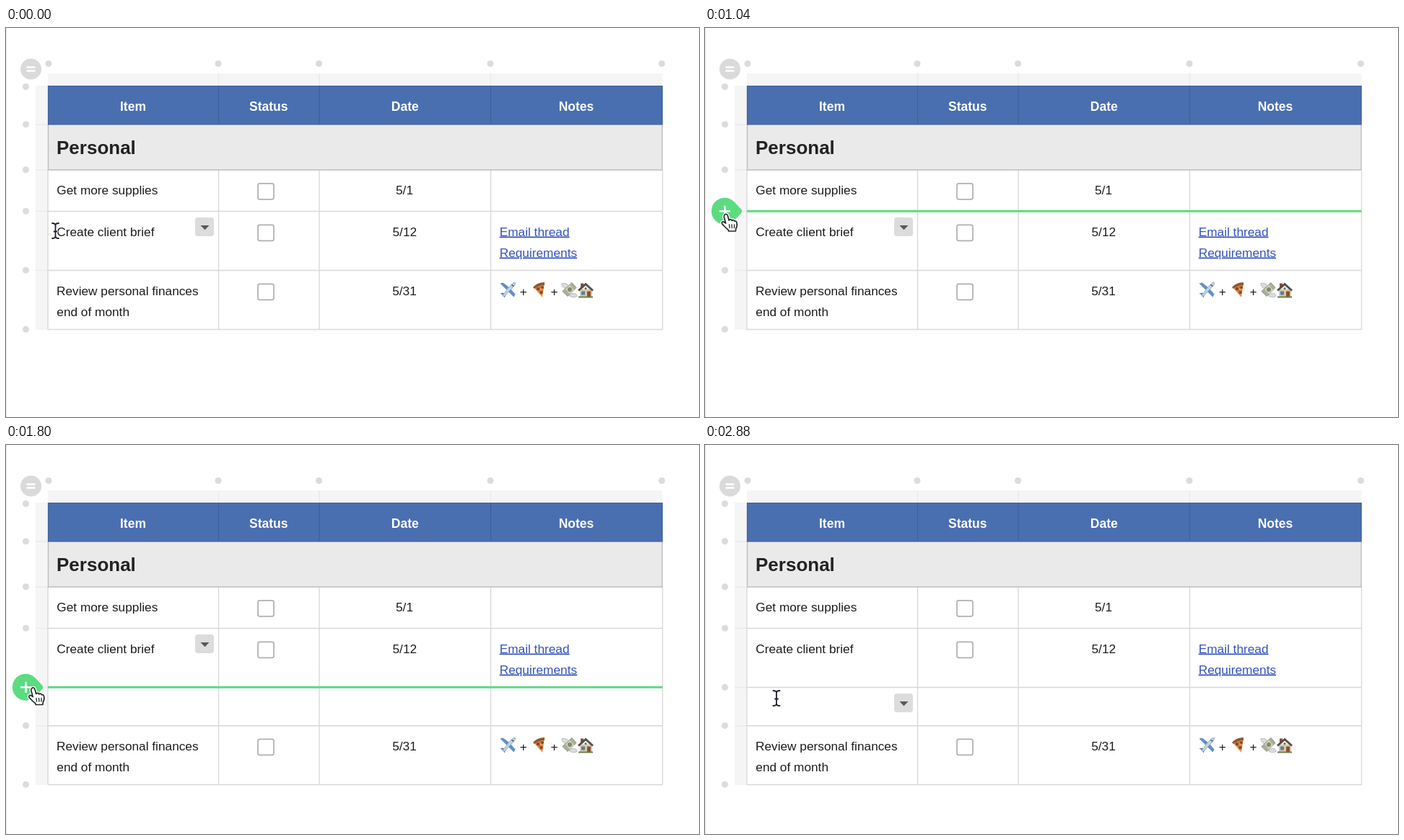
An HTML page that plays this animation: 960x540 px, repeating every 2900 ms.

```html
<!DOCTYPE html>
<html lang="en">
<head>
<meta charset="utf-8">
<title>Insert a table row</title>
<style>
  html, body { margin: 0; width: 100%; height: 100%; overflow: hidden; background: #fff; }
  svg { display: block; width: 960px; height: 540px; }
  text { font: 17.25px "Liberation Sans", Arial, sans-serif; fill: #1c1c1c; }
  .head { font-weight: bold; font-size: 17.5px; fill: #fff; }
  .group { font-weight: bold; font-size: 26px; fill: #222; }
  .mid { text-anchor: middle; }
  .link { fill: #3453bd; text-decoration: underline; }
</style>
</head>
<body>
<svg viewBox="0 0 960 540">
  <defs>
    <g id="plane" stroke-linejoin="round">
      <path d="M1 2L5 1L13 7L10 11ZM20 21L22 17L15 9L11 12Z" fill="#5f8fc8"/>
      <path d="M1 16L5 15L9 18L7 22L5 18Z" fill="#4779b5"/>
      <path d="M4 19L16 4Q20 0 22 1Q23 3 19 7L7 20Z" fill="#c3d3e3" stroke="#7f96b0" stroke-width=".7"/>
      <path d="M17 4L20 6" stroke="#34506f" stroke-width="1.5"/>
    </g>
    <g id="pizza">
      <path d="M2 7Q8 0 17 1L14 21Z" fill="#d99a4a"/>
      <path d="M1 7Q7 0 17 0L17 4Q9 4 3 9Z" fill="#8f5832"/>
      <g fill="#a53a2b"><circle cx="8" cy="9" r="2.3"/><circle cx="14" cy="7" r="2"/><circle cx="12.5" cy="14" r="2.2"/></g>
      <path d="M10 6l2 1M9 12l2-1M14 11l1 0" stroke="#5d7a35" stroke-width="1.2"/>
    </g>
    <g id="money">
      <path d="M5 9Q0 6 1 2Q8 1 11 6ZM15 16Q22 15 22 20Q17 23 11 19Z" fill="#d9dde0" stroke="#a4a9ab" stroke-width=".7"/>
      <path d="M2 13L15 1L21 8L9 20Z" fill="#a8b09a" stroke="#77806c" stroke-width=".8"/>
      <path d="M6 10L12 4L18 11L12 17Z" fill="#d6d0b4"/>
      <circle cx="12" cy="10.500" r="3" fill="#7f8b72"/>
    </g>
    <g id="house">
      <path d="M3 10H20V21H3Z" fill="#d8c8a9"/>
      <path d="M4 2H8V8H4Z" fill="#8d4c3b"/>
      <path d="M0 11L11 1L22 11L20 13L11 5L2 13Z" fill="#55504c"/>
      <path d="M5 13H10V18H5Z" fill="#597f9f"/>
      <path d="M13 13H18V21H13Z" fill="#8a5131"/>
      <path d="M1 20H21V22H1Z" fill="#65804b"/>
      <circle cx="11" cy="9" r="1.500" fill="#6c6257"/>
    </g>
  </defs>

  <path d="M.5 0V540" stroke="#e4e4e4"/>
  <g id="corner">
    <circle cx="34.500" cy="57" r="14.500" fill="#dadada"/>
    <path d="M28.500 54.500H40.500M28.500 59.500H40.500" stroke="#fff" stroke-width="2.300"/>
  </g>
  <g id="grid"></g>
  <g id="rows"></g>
  <g id="lastRow"></g>

  <g id="menu">
    <rect x="262" y="-13" width="26" height="26" rx="4" fill="#dcdcdc"/>
    <path d="M269.500-2H281.500L275.500 4.200Z" fill="#58585c"/>
  </g>
  <path id="caret" d="M71.300-15V12" stroke="#111" stroke-width="1.600"/>

  <g id="pin">
    <path d="M58 0H909.500" stroke="#5bdc80" stroke-width="3"/>
    <path d="M40.500-13L50.200-2.500Q52.200 0 50.200 2.500L40.500 13A18.500 18.500 0 1 1 40.500-13Z" fill="#5bdc80"/>
    <path d="M20 0H35M27.500-7.500V7.500" stroke="#fff" stroke-width="2.600"/>
  </g>

  <g id="hand" stroke-linejoin="round" stroke-linecap="round">
    <path id="palm" d="M-1.500 1C0-.8 2.500-.3 3 2L4.700 8.500C6 6.700 8.300 7.300 8.700 8.900C10 7.500 12 8.200 12.500 9.800C14 9 15.300 10.200 15.600 12C16.300 15 16 17.500 14.300 20L14 23.500H4.200L3.600 21.500C1 20-1.800 16.500-4.300 14.200C-6.500 12-4.500 9.500-2 10.900L.2 12.500L-2 4.500C-2.400 3-2.300 2-1.500 1Z" fill="#fff" stroke="#fff" stroke-width="4"/>
    <use href="#palm" style="stroke-width:4"/>
    <path id="handLine" fill="#fff" stroke="#24242c" stroke-width="1.700"/>
    <path d="M5 14.500L5.600 19M8.500 14.500L8.900 19M12 14.300V19" stroke="#24242c" stroke-width="1.300"/>
  </g>

  <g id="beam" fill="none" stroke-linecap="round">
    <path d="M-4.500-10.500Q0-10.500 0-7.500Q0-10.500 4.500-10.500M0-7.500V7.500M-4.500 10.500Q0 10.500 0 7.500Q0 10.500 4.500 10.500M-2 1H2" stroke="#fff" stroke-width="3.500"/>
    <path d="M-4.500-10.500Q0-10.500 0-7.500Q0-10.500 4.500-10.500M0-7.500V7.500M-4.500 10.500Q0 10.500 0 7.500Q0 10.500 4.500 10.500M-2 1H2" stroke="#20202e" stroke-width="1.800"/>
  </g>
</svg>
<script>
const LOOP = 2900;
const INSERT_AT = 1700, FOCUS_NEW_AT = 2350;
const NEW_ROW = 53;
const cols = [58, 294.5, 434, 671.5, 909.5];
const rowEdges = [80, 134, 197, 254.5, 336.5, 418.5];

// Time, x, y of the pointer's hot spot.
const path = [
  [0, 68.5, 281.5], [540, 68.5, 281.5], [700, 34.5, 267], [880, 28.5, 258.5],
  [1140, 28.5, 258.5], [1340, 36.5, 336.5], [1780, 37, 337], [2180, 37, 337],
  [2340, 99, 351.5], [LOOP, 99, 351.5]
];
const caretOn = [[450, 880], [1220, 1580], [FOCUS_NEW_AT, 2720]];
const pins = [[820, 1180, 254.5], [1300, 2230, 336.5]];

const $ = id => document.getElementById(id);
const within = (t, [from, to]) => t >= from && t < to;
const show = (el, on) => el.setAttribute("visibility", on ? "visible" : "hidden");
const move = (el, x, y) => el.setAttribute("transform", `translate(${x} ${y})`);

const text = (s, x, y, cls = "") => `<text x="${x}" y="${y}" class="${cls}">${s}</text>`;
const rect = (x, y, w, h, fill) => `<rect x="${x}" y="${y}" width="${w}" height="${h}" fill="${fill}"/>`;
const line = (d, color, w = 1.4) => `<path d="${d}" fill="none" stroke="${color}" stroke-width="${w}"/>`;
const dot = (x, y) => `<circle cx="${x}" cy="${y}" r="4.500" fill="#dcdcdc"/>`;
const check = y => `<rect x="349" y="${y}" width="22" height="22" rx="2.500" fill="#fff" stroke="#b0b0b0" stroke-width="1.700"/>`;
const icon = (id, x, y) => `<use href="#${id}" x="${x}" y="${y}"/>`;

function drawGrid(inserted) {
  const edges = inserted ? [...rowEdges.slice(0, 5), 389.8, 418.5 + NEW_ROW] : rowEdges;
  const bottom = edges[edges.length - 1];
  let s = rect(58, 63, 851.5, 17, "#f5f5f5") + rect(41, 80, 17, bottom - 79.5, "#f5f5f5");
  s += cols.slice(1, 4).map(x => line(`M${x} 63V80`, "#e9e9e9")).join("");
  s += edges.slice(1, -1).map(y => line(`M41 ${y}H58`, "#e9e9e9")).join("");
  s += edges.slice(3).map(y => line(`M58 ${y}H909.5`, "#d9d7d7")).join("");
  s += cols.map(x => line(`M${x} 197V${bottom}`, "#dcd7d7")).join("");
  s += rect(58, 134, 851.5, 63, "#eaeaea") + line("M58.5 134V197H909V134", "#bdbdbd");
  s += rect(58, 80, 851.5, 54, "#4a6fb0") + line("M58.500 80.500H909V134H58.500Z", "#405f99", 1.2);
  s += cols.slice(1, 4).map(x => line(`M${x} 80V134`, "#405f99", 1.2)).join("");
  s += [59, 294, 433.5, 671, 908.5].map(x => dot(x, 49.5)).join("");
  s += edges.map((y, i) => dot(27.5, i ? y - .3 : 81.5)).join("");
  $("grid").innerHTML = s;
}

$("rows").innerHTML =
  text("Item", 176, 114.5, "head mid") + text("Status", 363.8, 114.5, "head mid") +
  text("Date", 552.8, 114.5, "head mid") + text("Notes", 790, 114.5, "head mid") +
  text("Personal", 70, 175, "group") +
  text("Get more supplies", 70.3, 231) + check(215.8) + text("5/1", 552, 231, "mid") +
  text("Create client brief", 70.3, 288.5) + check(273.3) + text("5/12", 552.3, 288.5, "mid") +
  text("Email thread", 683.7, 288.5, "link") + text("Requirements", 683.7, 317.5, "link");

$("lastRow").innerHTML =
  text("Review personal finances", 70, 370.8) + text("end of month", 70.3, 399.5) +
  check(355.3) + text("5/31", 552, 370.8, "mid") +
  icon("plane", 683.5, 352.5) + text("+", 716.7, 371.5, "mid") + icon("pizza", 729, 353) +
  text("+", 759.5, 371.5, "mid") + icon("money", 769, 352.5) + icon("house", 792, 352.5);

$("handLine").setAttribute("d", $("palm").getAttribute("d"));

function pointerAt(t) {
  const i = path.findIndex(p => p[0] > t);
  const [t0, x0, y0] = path[i - 1], [t1, x1, y1] = path[i];
  const u = (t - t0) / (t1 - t0), k = u * u * (3 - 2 * u);
  return [x0 + (x1 - x0) * k, y0 + (y1 - y0) * k];
}

let wasInserted = null;
function render(t) {
  const inserted = t >= INSERT_AT;
  if (inserted !== wasInserted) {
    drawGrid(inserted);
    move($("lastRow"), 0, inserted ? NEW_ROW : 0);
    wasInserted = inserted;
  }

  const focusY = t >= FOCUS_NEW_AT ? 363 : 281;
  move($("caret"), 0, focusY + .5);
  show($("caret"), caretOn.some(span => within(t, span)));
  move($("menu"), 0, focusY - 5);

  const pin = pins.find(p => within(t, p));
  show($("pin"), !!pin);
  if (pin) move($("pin"), 0, pin[2] - .3);

  const [x, y] = pointerAt(t);
  const overCell = x > 58;
  show($("beam"), overCell);
  show($("hand"), !overCell);
  move($(overCell ? "beam" : "hand"), x, y);
}

const start = performance.now();
function tick() {
  render((performance.now() - start) % LOOP);
  requestAnimationFrame(tick);
}
render(0);
requestAnimationFrame(tick);
</script>
</body>
</html>
```
